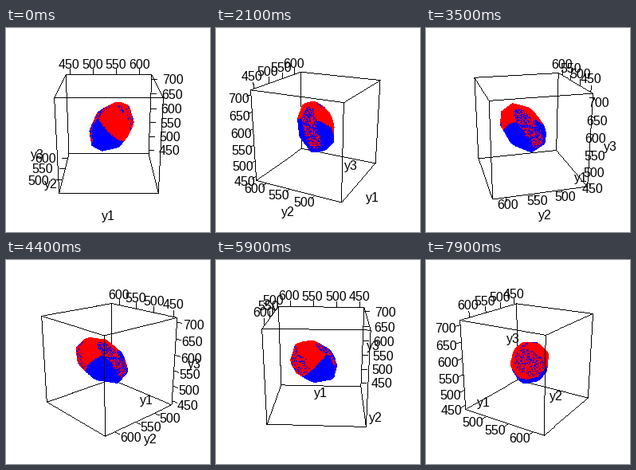
Animation, 256 px wide and 256 px high, one loop 8 s. Source, as a matplotlib script:

```python
import numpy as np
import matplotlib.pyplot as plt
from matplotlib.animation import FuncAnimation
from matplotlib.collections import PolyCollection

SIZE, DPI = 256, 64
PX = 72 / DPI                  # points per pixel
FRAMES, INTERVAL, STEP = 80, 100, 3
TILT = np.radians(20)
FOCAL = SIZE / 2 / np.tan(np.radians(15))
DIST = 8.27                    # camera distance in half box sides
TICK = 2 / 15
TITLE = 1.31
LABEL_W = 26.7

# centre, half range and tick values of each axis
AXES = [(533.4, 92.7, range(450, 601, 50)),
        (535.8, 86.5, range(500, 601, 50)),
        (574.3, 139.0, range(450, 701, 50))]


def project(p, theta):
    """Return screen x, screen y (down) and depth towards the viewer."""
    p = np.asarray(p, float)
    x, y, z = p[..., 0], p[..., 1], p[..., 2]
    c, s = np.cos(theta), np.sin(theta)
    right, near = x * c - y * s, -x * s - y * c
    up = z * np.cos(TILT) - near * np.sin(TILT)
    depth = z * np.sin(TILT) + near * np.cos(TILT)
    k = FOCAL / (DIST - depth)
    return np.stack([SIZE / 2 + right * k, SIZE / 2 - up * k, depth], -1)


def box_edges():
    edges = []
    for axis in range(3):
        for a in (-1, 1):
            for b in (-1, 1):
                lo = np.insert([a, b], axis, -1)
                hi = np.insert([a, b], axis, 1)
                edges.append((lo, hi))
    return np.array(edges, float)


def make_hull():
    """Faceted elongated body as a fine mesh, coloured in two halves."""
    rng = np.random.default_rng(5)
    center = np.array([0.08, 0.10, 0.04])
    spread = np.array([[0.250, 0.075, 0.071],
                       [0.075, 0.235, 0.070],
                       [0.071, 0.070, 0.260]])
    count = 28
    n = np.arange(count) + 0.5
    h = 1 - 2 * n / count
    turn = n * np.pi * (3 - 5 ** 0.5)
    r = np.sqrt(1 - h * h)
    planes = np.stack([r * np.cos(turn), r * np.sin(turn), h], -1)
    planes += rng.normal(0, 0.07, planes.shape)
    planes /= np.linalg.norm(planes, axis=1)[:, None]

    a, b = np.meshgrid(np.linspace(0.001, np.pi - 0.001, 67),
                       np.linspace(0, 2 * np.pi, 121), indexing="ij")
    u = np.stack([np.sin(a) * np.cos(b), np.sin(a) * np.sin(b), np.cos(a)], -1)
    u = u * (0.9 / (u @ planes.T).max(-1))[..., None]
    v = center + u @ np.linalg.cholesky(spread).T
    quads = np.stack([v[:-1, :-1], v[1:, :-1], v[1:, 1:], v[:-1, 1:]], 2)
    quads = quads.reshape(-1, 4, 3)

    mid = quads.mean(1)
    rel = mid - center
    red = rel[:, 0] + rel[:, 2] > -0.04
    chance = rng.random(len(mid))

    def near(start, end, radius):
        start, end = np.array(start), np.array(end)
        d = end - start
        t = np.clip((mid - start) @ d / (d @ d), 0, 1)
        return np.linalg.norm(mid - start - t[:, None] * d, axis=1) < radius

    # zones where the two colours mingle
    band = near([-0.12, 0.24, 0.53], [-0.44, -0.14, -0.18], 0.16)
    red = np.where(band, chance < 0.5, red)
    red &= ~(near([0.45, 0.25, 0.2], [0.35, 0.4, 0.1], 0.26) & (chance < 0.25))
    red &= ~(near([0.34, 0.03, 0.49], [0.3, 0.1, 0.55], 0.1) & (chance < 0.4))
    colors = np.where(red[:, None], [1.0, 0, 0], [0, 0, 1.0])
    return quads, colors


EDGES = box_edges()
HULL, HULL_COLORS = make_hull()


def tick_edges(theta):
    """For each axis: the edge's fixed coordinates and the tick direction."""
    c, s = np.cos(theta), np.sin(theta)
    side = -1 if s > 0 else 1          # x face turned to the viewer
    back = 1 if c > 0 else -1          # y face turned away
    x_edge = ([0, back, 1], [0, 0, 1])
    if s == 0:
        y_edge = ([-1, 0, -1], [-1, 0, 0])
    elif abs(s) > np.tan(TILT):
        y_edge = ([side, 0, -1], [side, 0, 0])
    else:
        y_edge = ([-side, 0, 1], [0, 0, 1])
    z_edge = ([side, back, 0], [side, 0, 0])
    return x_edge, y_edge, z_edge


def trace(segments):
    """Pixel centres along straight lines, one per step of the long side."""
    points = []
    for a, b in segments:
        n = int(np.ceil(np.abs(b - a).max())) + 1
        points.append(np.floor(np.linspace(a, b, n)) + 0.5)
    return np.concatenate(points).T


fig = plt.figure(figsize=(SIZE / DPI, SIZE / DPI), dpi=DPI, facecolor="white")
ax = fig.add_axes([0, 0, 1, 1])
ax.set_xlim(0, SIZE)
ax.set_ylim(SIZE, 0)
ax.axis("off")


def add_lines(z):
    return ax.plot([], [], "k,", zorder=z)[0]


def add_text(s):
    return ax.text(0, 0, s, fontname="Liberation Sans", fontsize=16 * PX,
                   ha="center", va="baseline", zorder=4)


far_lines, near_lines = add_lines(1), add_lines(3)
body = ax.add_collection(PolyCollection([], linewidths=0, edgecolors="none",
                                        antialiaseds=False, zorder=2),
                         autolim=False)
labels = [[add_text(str(v)) for v in axis[2]] for axis in AXES]
titles = [add_text(s) for s in ("y1", "y2", "y3")]


def put(text, x, y):
    text.set_position((x, y + 6))


def draw_body(theta):
    q = project(HULL, theta)
    d1, d2 = q[:, 2] - q[:, 0], q[:, 3] - q[:, 1]
    front = d1[:, 0] * d2[:, 1] - d1[:, 1] * d2[:, 0] < 0
    body.set_verts(q[front, :, :2])
    body.set_facecolor(HULL_COLORS[front])


def update(i):
    theta = np.radians(STEP * i)
    segs = project(EDGES, theta)
    is_near = segs[..., 2].mean(1) > 0
    far = list(segs[~is_near][..., :2])
    near = list(segs[is_near][..., :2])

    for axis, (edge, out) in enumerate(tick_edges(theta)):
        mid, half, values = AXES[axis]
        out = np.array(out, float)
        # labels slide sideways as their ticks turn to the side
        lean = out[0] * np.cos(theta)
        shift = np.sign(lean) * 0.5 * np.clip((abs(lean) - 0.24) * 1.5, 0, 1)
        for text, value in zip(labels[axis], values):
            p = np.array(edge, float)
            p[axis] = (value - mid) / half
            a, b, c = project([p, p + out * TICK, p + 2 * out * TICK], theta)
            (near if a[2] > 0 else far).append(np.array([a[:2], b[:2]]))
            put(text, c[0] + shift * LABEL_W, c[1])

    for axis, text in enumerate(titles):
        p = np.full(3, -TITLE)
        p[axis] = 0
        x, y, _ = project(p, theta)
        put(text, x, y)

    far_lines.set_data(*trace(far))
    near_lines.set_data(*trace(near))
    draw_body(theta)
    return []


anim = FuncAnimation(fig, update, frames=FRAMES, interval=INTERVAL,
                     repeat=True, repeat_delay=0, blit=False)
plt.show()
```
